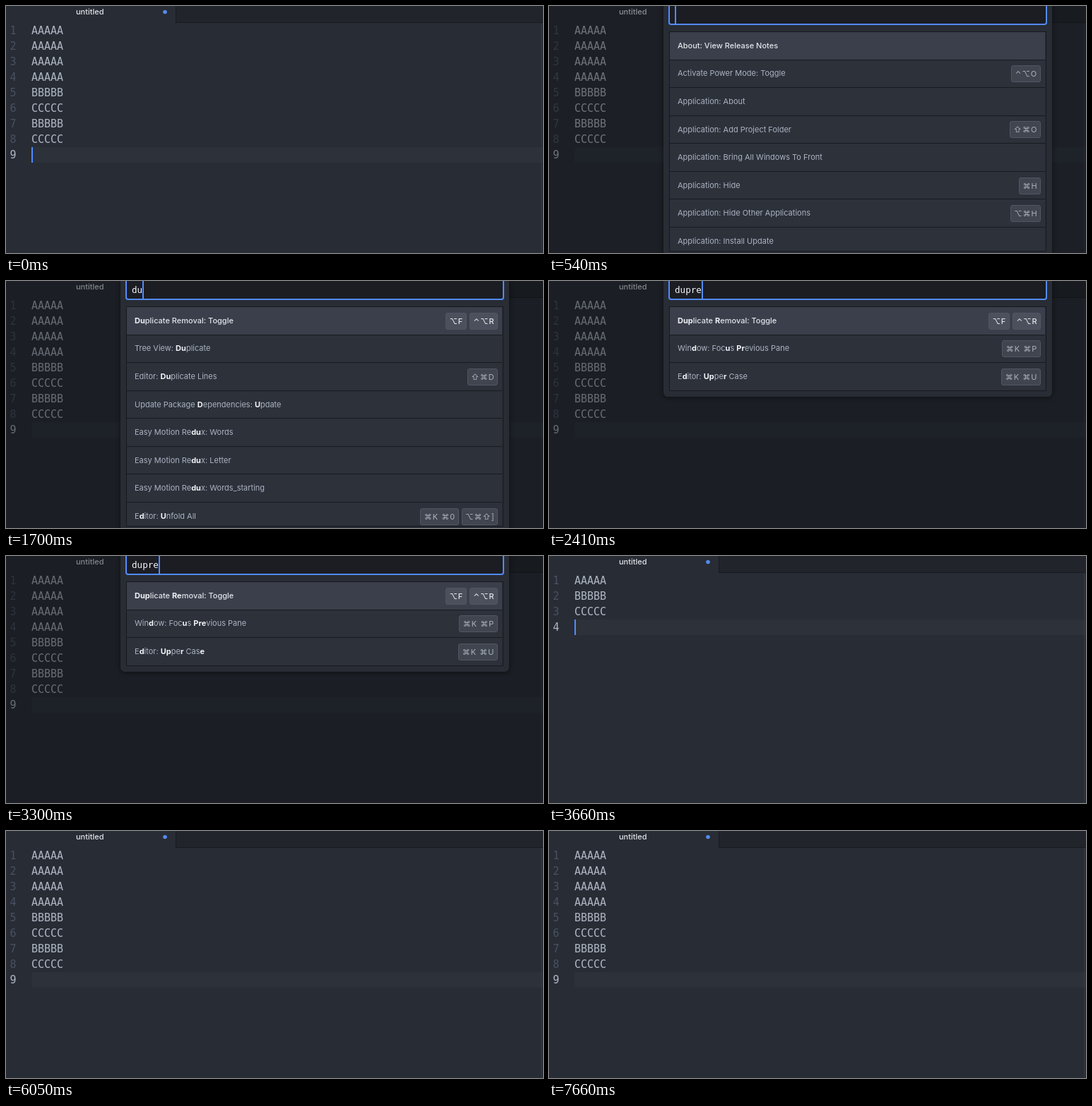
These frames come from a looping animation (760 by 350 pixels, 8000 ms). An HTML page:

```html
<!DOCTYPE html>
<html lang="en">
<head>
<meta charset="utf-8">
<title>Command palette</title>
<style>
  html, body { margin: 0; width: 100%; height: 100%; overflow: hidden; background: #282c34; }
  svg { display: block; }
  text { white-space: pre; }
  .code { font: 15px "DejaVu Sans Mono", monospace; fill: #b0b7c4; }
  .number { fill: #495162; }
  .ui { font: 11px Inter, "DejaVu Sans", sans-serif; fill: #acb3c1; }
  .bright { font-weight: 500; fill: #e2e5eb; }
  .match { font-weight: 700; fill: #f0f2f6; }
  .query { font: 12.6px "DejaVu Sans Mono", monospace; fill: #f4f5f8; }
  .key { letter-spacing: 1px; text-anchor: middle; }
  .panel { filter: drop-shadow(0 1px 3px rgba(0, 0, 0, .5)); }
</style>
</head>
<body>
<svg id="stage" width="760" height="350" viewBox="0 0 760 350"></svg>
<script>
const LOOP = 8000;
const ROW = 39.57;
const LINE = 22;
const ACCENT = '#528bff';
const stage = document.getElementById('stage');

const FULL = 'AAAAA AAAAA AAAAA AAAAA BBBBB CCCCC BBBBB CCCCC'.split(' ');
const UNIQUE = [...new Set(FULL)];

// Asterisks surround matched letters; keys are [label, badge width].
const item = (label, ...keys) => ({ label, keys });
const REMOVAL_KEYS = [['⌥F', 30], ['⌃⌥R', 40]];

const LISTS = {
  '': [
    item('About: View Release Notes'),
    item('Activate Power Mode: Toggle', ['⌃⌥O', 42]),
    item('Application: About'),
    item('Application: Add Project Folder', ['⇧⌘O', 44]),
    item('Application: Bring All Windows To Front'),
    item('Application: Hide', ['⌘H', 31]),
    item('Application: Hide Other Applications', ['⌥⌘H', 43]),
    item('Application: Install Update')
  ],
  du: [
    item('*Du*plicate Removal: Toggle', ...REMOVAL_KEYS),
    item('Tree View: *Du*plicate'),
    item('Editor: *Du*plicate Lines', ['⇧⌘D', 43]),
    item('Update Package *D*ependencies: *U*pdate'),
    item('Easy Motion Re*du*x: Words'),
    item('Easy Motion Re*du*x: Letter'),
    item('Easy Motion Re*du*x: Words_starting'),
    item('E*d*itor: *U*nfold All', ['⌘K ⌘0', 55], ['⌥⌘⇧]', 51])
  ],
  dup: [
    item('*Dup*licate Removal: Toggle', ...REMOVAL_KEYS),
    item('Tree View: *Dup*licate'),
    item('Editor: *Dup*licate Lines', ['⇧⌘D', 43]),
    item('Update Package *D*ependencies: *Up*date'),
    item('Win*d*ow: Foc*u*s *P*revious Pane', ['⌘K ⌘P', 55]),
    item('E*d*itor: *Up*per Case', ['⌘K ⌘U', 56]),
    item('E*d*itor: Move Line *Up*', ['⌃⌘↑', 43]),
    item('E*d*itor: Move Selection *Up*')
  ],
  dupr: [
    item('*Dup*licate *R*emoval: Toggle', ...REMOVAL_KEYS),
    item('Win*d*ow: Foc*u*s *Pr*evious Pane', ['⌘K ⌘P', 55]),
    item('E*d*itor: *Up*pe*r* Case', ['⌘K ⌘U', 56])
  ],
  dupre: [
    item('*Dup*licate *Re*moval: Toggle', ...REMOVAL_KEYS),
    item('Win*d*ow: Foc*u*s *Pre*vious Pane', ['⌘K ⌘P', 55]),
    item('E*d*itor: *Up*pe*r* Cas*e*', ['⌘K ⌘U', 56])
  ]
};

// Each track holds its value until the next time.
const TRACKS = {
  lines: [[0, FULL], [3660, UNIQUE], [5570, FULL]],
  dim: [[0, 0], [540, 0.4], [620, 0.44], [3660, 0]],
  query: [[0, ''], [1460, 'd'], [1640, 'du'], [1880, 'dup'], [2290, 'dupr'], [2410, 'dupre']],
  list: [[0, ''], [1700, 'du'], [1930, 'dup'], [2340, 'dupr'], [2460, 'dupre']],
  cursor: [[0, 1], [1040, 0], [1460, 1], [2940, 0], [3300, 1], [4200, 0], [4560, 1], [4970, 0],
    [5390, 1], [6050, 0], [6470, 1], [6890, 0], [7240, 1], [7660, 0]]
};

const valueAt = (track, t) => track.filter(([start]) => start <= t).pop()[1];

const rect = (x, y, w, h, fill, extra = '') =>
  `<rect x="${x}" y="${y}" width="${w}" height="${h}" fill="${fill}" ${extra}/>`;
const text = (x, y, cls, content) => `<text x="${x}" y="${y}" class="${cls}">${content}</text>`;

function editor(lines, cursor) {
  const last = lines.length;
  const top = 24 + last * LINE;
  let out = rect(0, 0, 760, 350, '#282c34')
    + rect(240, 0, 520, 24, '#21252b')
    + rect(240, 0, 1, 24, '#181a1f') + rect(240, 23, 520, 1, '#181a1f')
    + text(99, 12, 'ui bright', 'untitled')
    + `<circle cx="225" cy="8.5" r="2.8" fill="#568af2"/>`
    + rect(36, top, 724, LINE, '#2c313a')
    + rect(757, 24, 1, 326, '#343942');
  for (let i = 0; i <= last; i++) {
    const y = 40 + i * LINE;
    out += text(5.5, y, i < last ? 'code number' : 'code', i + 1);
    if (i < last) out += text(36, y, 'code', lines[i]);
  }
  return cursor ? out + rect(36, top, 2, LINE, ACCENT) : out;
}

function badges(keys, middle, selected) {
  const fill = selected ? '#4b505c' : '#40454f';
  const cls = selected ? 'ui key bright' : 'ui key';
  let right = 696;
  return [...keys].reverse().map(([label, width]) => {
    const x = right - width;
    right = x - 4;
    return rect(x + 0.5, middle - 11.5, width - 1, 23, fill, 'rx="2.5" stroke="#515662"')
      + text(x + width / 2 + 0.5, middle + 4, cls, label);
  }).join('');
}

const rowTop = i => Math.round(36 + i * ROW) + 1;

function listRow({ label, keys }, i) {
  const selected = i === 0;
  const top = rowTop(i);
  const height = rowTop(i + 1) - top;
  const y = 36.5 + i * ROW;
  const marked = label.replace(/\*(.+?)\*/g, '<tspan class="match">$1</tspan>');
  return rect(171, top, 531, height, selected ? '#3a3f4b' : '#2c313a')
    + rect(171, top + height - 1, 531, 1, '#181a1f')
    + text(182, Math.round(y + 23.4), selected ? 'ui bright' : 'ui', marked)
    + badges(keys, Math.round(y + 20.2), selected);
}

function palette(query, items, cursor) {
  const bottom = Math.min(347.5, Math.round(36 + items.length * ROW) + 0.5);
  const panelBottom = items.length < 8 ? bottom + 8.5 : 360;
  let out = rect(162, -20, 550, panelBottom + 20, '#282c34', 'rx="6" class="panel"')
    + rect(170, -2, 534, 28, '#1b1d23', `rx="3" stroke="${ACCENT}" stroke-width="2"`)
    + text(178, 17, 'query', query);
  if (cursor) out += rect(Math.round(178 + query.length * 7.586), 0, 2, 25, ACCENT);
  return out
    + `<clipPath id="list">${rect(170, 36, 534, bottom - 36, '#000')}</clipPath>`
    + `<g clip-path="url(#list)">${items.map(listRow).join('')}</g>`
    + rect(170.5, 36.5, 533, bottom - 36.5, 'none', 'stroke="#181a1f"');
}

let shown = '';

function render(t) {
  const state = {};
  for (const name in TRACKS) state[name] = valueAt(TRACKS[name], t);
  const key = JSON.stringify(state);
  if (key === shown) return;
  shown = key;
  const { lines, dim, query, list, cursor } = state;
  stage.innerHTML = editor(lines, cursor && !dim)
    + (dim ? rect(0, 0, 760, 350, '#0b0d11', `opacity="${dim}"`) + palette(query, LISTS[list], cursor) : '');
}

const start = performance.now();
function tick() {
  render((performance.now() - start) % LOOP);
  requestAnimationFrame(tick);
}
tick();
</script>
</body>
</html>
```
